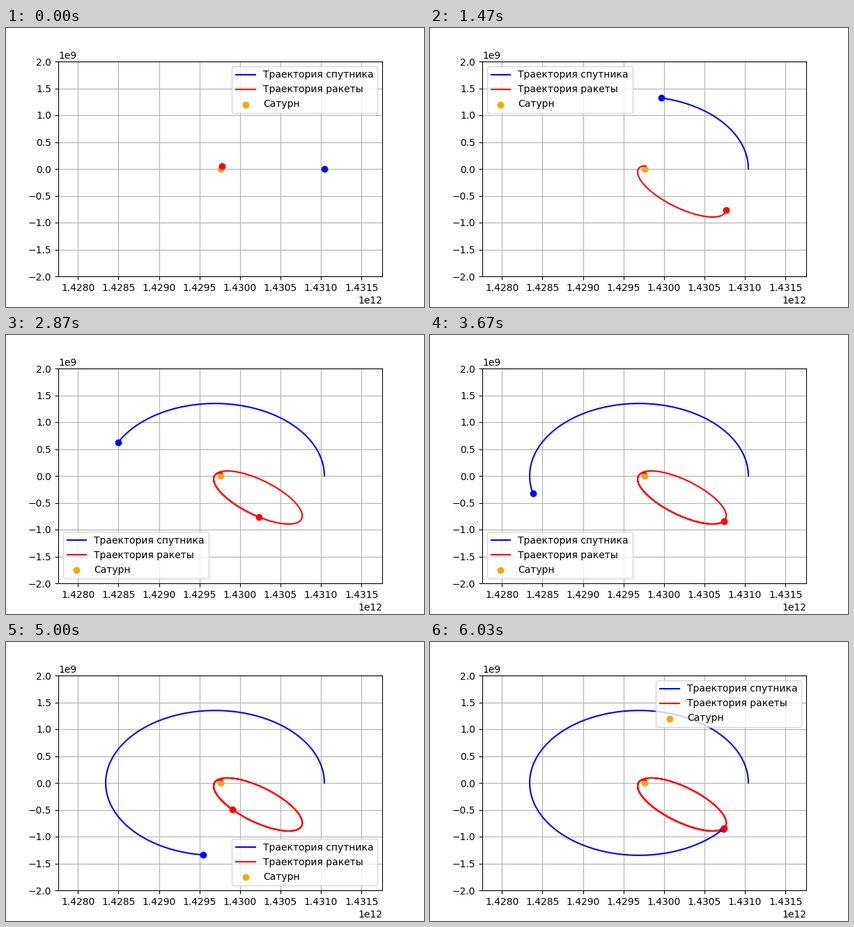
Write a matplotlib script that moves like this. It is 600 px wide and 400 px high and loops after 6.06 s.

```python
import numpy as np
import matplotlib.pyplot as plt
from matplotlib.animation import FuncAnimation

FRAMES, LOOP_MS, SUB = 182, 6060, 16
CENTER = 1.429756e12
HALF = 2e9
START = np.array([0.0215e9, 0.052e9])


def kepler(mean, a, ecc, peri):
    """Position relative to the focus for mean anomaly in degrees."""
    m = np.radians(mean) % (2 * np.pi)
    E = np.full_like(m, np.pi)
    for _ in range(30):
        E -= (E - ecc * np.sin(E) - m) / (1 - ecc * np.cos(E))
    p = a * (np.cos(E) - ecc)
    q = a * np.sqrt(1 - ecc ** 2) * np.sin(E)
    w = np.radians(peri)
    return np.array([p * np.cos(w) - q * np.sin(w),
                     p * np.sin(w) + q * np.cos(w)])


# Time starts slowly during the launch, then runs evenly.
u = np.arange((FRAMES - 1) * SUB + 1) / SUB
t = np.where(u < 4, u ** 2 / 8, u - 2)

moon = kepler(1.8007 * t, 1.35e9, 0.0477, 0)
rocket = kepler(5.04 * (t - 0.2), 0.679e9, 0.906, 139.2)
rocket += (START - rocket[:, 0])[:, None] * np.exp(-t / 0.1)
for path in (moon, rocket):
    path[0] += CENTER

fig, ax = plt.subplots(figsize=(6, 4), dpi=100)
ax.set_xlim(CENTER - HALF, CENTER + HALF)
ax.set_ylim(-HALF, HALF)
ax.grid(True)

moon_line, = ax.plot([], [], color="blue", label="Траектория спутника")
rocket_line, = ax.plot([], [], color="red", label="Траектория ракеты")
moon_dot, = ax.plot([], [], "o", color="blue")
rocket_dot, = ax.plot([], [], "o", color="red")
ax.scatter([CENTER], [0], color="orange", label="Сатурн")
ax.legend(loc="best")

BODIES = ((moon, moon_line, moon_dot), (rocket, rocket_line, rocket_dot))


def update(k):
    end = k * SUB + 1
    for path, line, dot in BODIES:
        line.set_data(path[0, :end], path[1, :end])
        dot.set_data(path[0, end - 1:end], path[1, end - 1:end])
    return moon_line, rocket_line, moon_dot, rocket_dot


anim = FuncAnimation(fig, update, frames=FRAMES, interval=LOOP_MS / FRAMES,
                     repeat=True, repeat_delay=0, blit=False)
plt.show()
```
